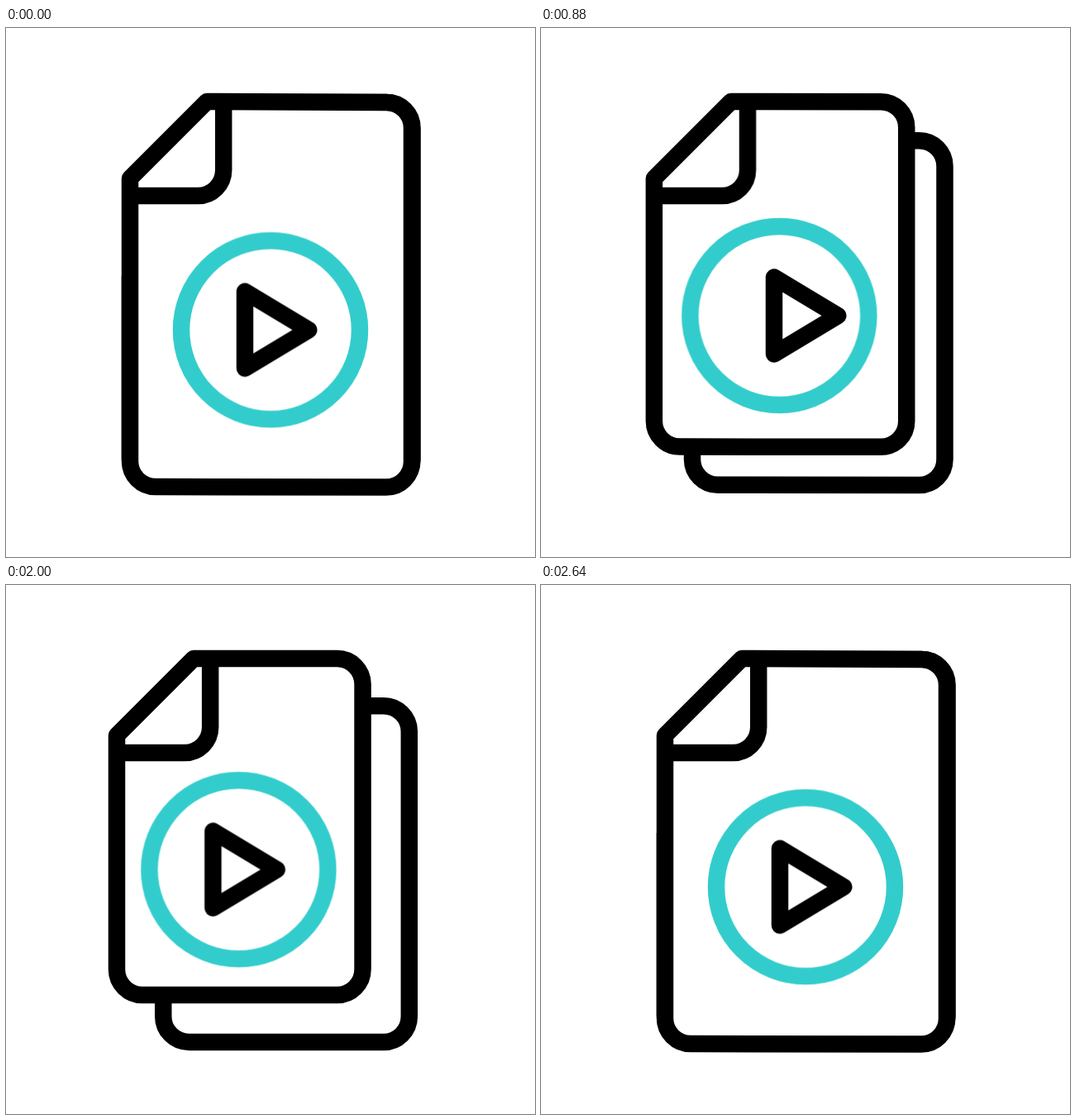
Write an HTML page that moves like this. It is 640 px wide and 640 px high and loops after 3000 ms.

```html
<!DOCTYPE html>
<html lang="en">
<head>
<meta charset="utf-8">
<title>Video file</title>
<style>
  html, body { margin: 0; width: 100%; height: 100%; overflow: hidden; background: #fff; }
  svg { display: block; width: 100%; height: 100%; }

  .line { fill: none; stroke: #000; stroke-width: 20.5; stroke-linejoin: round; }
  .ring { stroke: #3cc; }

  .front, .back, .fold, .badge, .play { animation: 3s cubic-bezier(.56, 0, .11, 1) infinite; }
  .front { animation-name: front; fill: #fff; }
  .back { animation-name: back; }
  .fold { animation-name: fold; }
  .badge { animation-name: badge; }
  .play { animation-name: swing; }

  /* The sheets part at 16%, rest apart, and close from 60.93%. */
  @keyframes front {
    0%, 16%, 88.33%, 100% {
      d: path("M150 182 L243 89 L460 90 A31 31 0 0 1 491 121 L491 524.5 A31 31 0 0 1 460 555.5 L181 555 A31 31 0 0 1 150 524 Z");
    }
    44.13%, 60.93% {
      d: path("M132.5 182 L225.5 89 L395 89 A31 31 0 0 1 426 120 L426 459.5 A31 31 0 0 1 395 490.5 L163.5 490.5 A31 31 0 0 1 132.5 459.5 Z");
      animation-timing-function: cubic-bezier(.52, 0, .2, 1);
    }
  }
  /* Open outline: its ends stay hidden under the front sheet. */
  @keyframes back {
    0%, 16%, 88.33%, 100% {
      d: path("M300 90 L460.5 90 A31 31 0 0 1 491.5 121 L491.5 522 A31 31 0 0 1 460.5 553 L181 552 A31 31 0 0 1 150 521 L150 300");
    }
    44.13%, 60.93% {
      d: path("M300 151.5 L456.5 151.5 A31 31 0 0 1 487.5 182.5 L487.5 522 A31 31 0 0 1 456.5 553 L225 553 A31 31 0 0 1 194 522 L194 300");
      animation-timing-function: cubic-bezier(.52, 0, .2, 1);
    }
  }
  @keyframes fold {
    0%, 16%, 88.33%, 100% { transform: translate(0, 0); }
    44.13%, 60.93% {
      transform: translate(-17.6px, 0);
      animation-timing-function: cubic-bezier(.52, 0, .2, 1);
    }
  }
  @keyframes badge {
    0%, 16%, 88.33%, 100% { transform: translate(320px, 365.3px); }
    44.13%, 60.93% {
      transform: translate(277.8px, 342.3px);
      animation-timing-function: cubic-bezier(.52, 0, .2, 1);
    }
  }
  @keyframes swing {
    0%, 21%, 60%, 100% { transform: translate(0, 0); }
    32% { transform: translate(25.4px, 0); }
    43.2% { transform: translate(-25.4px, 0); }
  }
</style>
</head>
<body>
<svg viewBox="0 0 640 640">
  <path class="line back" d="M300 90"/>
  <path class="line front" d="M150 182"/>
  <path class="line fold" d="M263.2 89 V172 A31 31 0 0 1 232.2 203 H150"/>
  <g class="badge">
    <circle class="line ring" r="108"/>
    <path class="line play" d="M-31 -46.5 V46.5 L46.3 0 Z"/>
  </g>
</svg>
</body>
</html>
```
